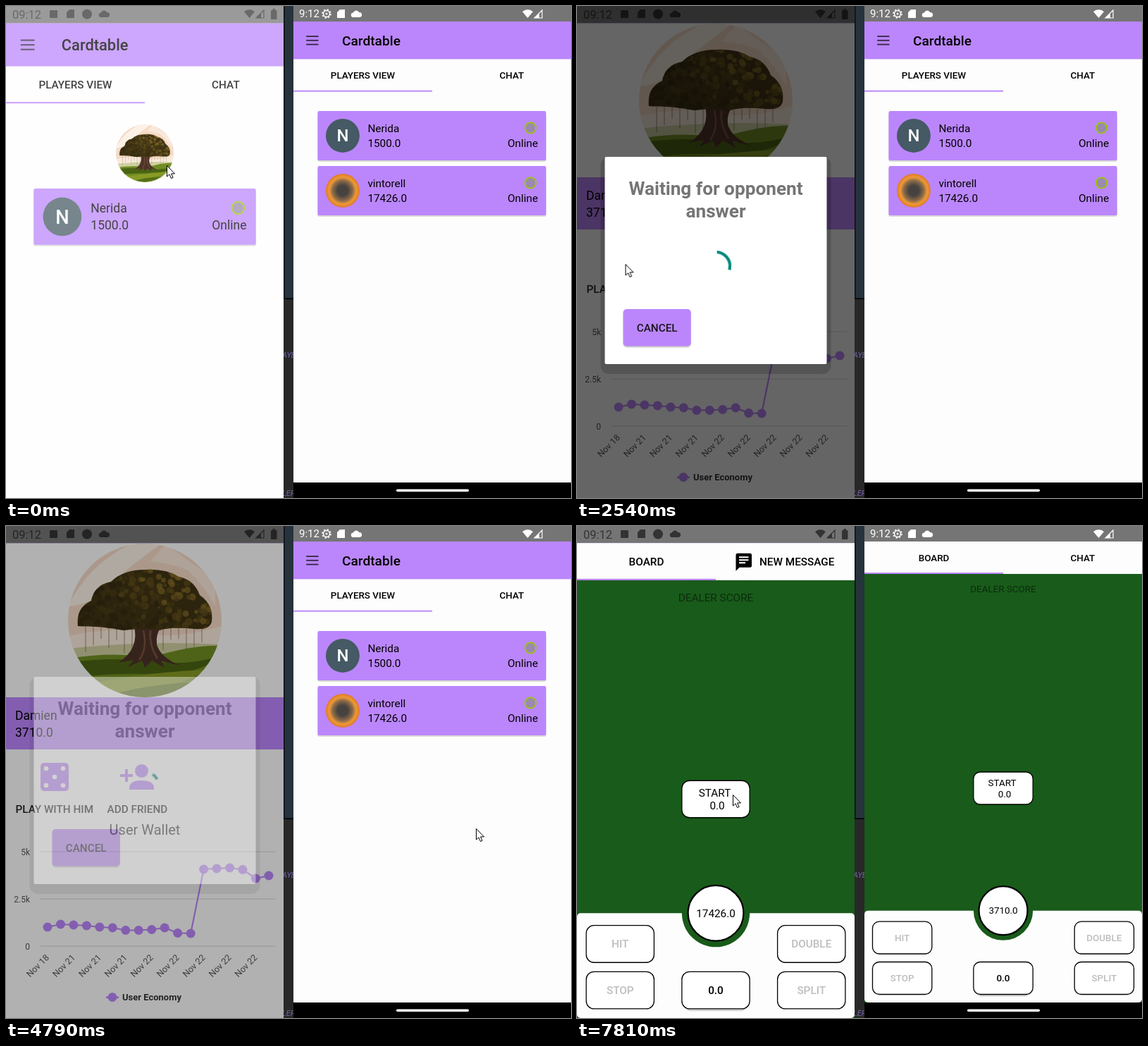
Animation, 802 px wide and 698 px high, one loop 8000 ms. Source, as an HTML page:

```html
<!DOCTYPE html>
<html lang="en">
<head>
<meta charset="utf-8">
<title>Card table on two phones</title>
<style>
html, body { margin: 0; width: 100%; height: 100%; overflow: hidden; background: #000; }
svg { display: block; width: 802px; height: 698px; font-family: Roboto, sans-serif; }
.m { font-weight: 500; }
.b { font-weight: 700; }
.k { animation: 8s step-end infinite; }

#wash { animation-name: wash; }
#profile { animation-name: profile; }
#tree { animation-name: tree; }
#chart { animation-name: chart; }
#reveal { animation-name: reveal; }
#dimL { animation-name: dimL; }
#refused { animation-name: refused; }
#waiting { animation-name: waiting; }
#boardL { animation-name: boardL; }
#dimR { animation-name: dimR; }
#invite { animation-name: invite; }
#boardR { animation-name: boardR; }
#cursor { animation-name: cursor; }

@keyframes wash { 0% { opacity: .265 } 1.5% { opacity: .2 } 3% { opacity: .1 } 4.5% { opacity: 0 } }
@keyframes profile { 0% { opacity: 0 } 1.5% { opacity: .25 } 3% { opacity: .6 } 4.5% { opacity: 1 } }
@keyframes tree {
  0% { transform: translate(197px, 209px) scale(.376) }
  1.5% { transform: translate(197px, 176px) scale(.6) }
  3% { transform: translate(197px, 146px) scale(.88) }
  4.5% { transform: translate(197px, 134px) }
}
@keyframes chart { 0% { opacity: 0 } 8.25% { opacity: 1 } }
@keyframes reveal { 0% { transform: scaleX(.45) } 9.75% { transform: scaleX(1) } }
@keyframes dimL { 0% { opacity: 0 } 29.875% { opacity: .2 } 31.75% { opacity: .6 } 59.875% { opacity: .3 } 61.375% { opacity: 0 } }
@keyframes refused { 0% { opacity: 0 } 29.875% { opacity: .72 } 31.75% { opacity: 0 } }
@keyframes waiting { 0% { opacity: 0 } 31.75% { opacity: 1 } 59.875% { opacity: .4 } 61.375% { opacity: 0 } }
@keyframes boardL { 0% { opacity: 0 } 66.25% { opacity: .5 } 67.75% { opacity: 1 } }
@keyframes dimR { 0% { opacity: 0 } 33.625% { opacity: .4 } 35.125% { opacity: .6 } 58% { opacity: 0 } }
@keyframes invite {
  0% { opacity: 0; transform: none }
  33.625% { opacity: .8; transform: translateX(20px) }
  35.125% { opacity: 1; transform: translateX(5.5px) }
  36.625% { opacity: 1; transform: translateX(1px) }
  38.5% { opacity: 1; transform: none }
  58% { opacity: 0; transform: none }
}
@keyframes boardR {
  0% { opacity: 0; transform: none }
  63.25% { opacity: .8; transform: translateX(18px) }
  64.75% { opacity: 1; transform: translateX(2.7px) }
  66.25% { opacity: 1; transform: none }
}
@keyframes cursor {
  0% { transform: translate(228px, 226px) }
  1.5% { transform: translate(210px, 238px) }
  3% { transform: translate(190px, 250px) }
  4.5% { transform: translate(173px, 260px) }
  6.375% { transform: translate(140px, 312px) }
  8.25% { transform: translate(115px, 322px) }
  9.75% { transform: translate(94px, 334px) }
  11.625% { transform: translate(80px, 350px) }
  13.125% { transform: translate(68.5px, 366px) }
  41.125% { transform: translate(440px, 400px) }
  43% { transform: translate(490px, 424px) }
  44.5% { transform: translate(527px, 430px) }
  46.375% { transform: translate(585px, 431px) }
  47.875% { transform: translate(635px, 432px) }
  49.75% { transform: translate(655px, 431px) }
  52.75% { transform: translate(667px, 430px) }
  56.125% { transform: translate(669px, 428px) }
  58% { transform: translate(667px, 429px) }
  69.25% { transform: translate(661px, 428px) }
  71.125% { transform: translate(620px, 425px) }
  72.625% { transform: translate(598px, 423px) }
  74.5% { transform: translate(327px, 368px) }
  78% { transform: translate(324px, 367px) }
  79.875% { transform: translate(318px, 345px) }
  81.375% { transform: translate(304px, 312px) }
  82.875% { transform: translate(286px, 291px) }
  84.75% { transform: translate(270px, 283px) }
  86.25% { transform: translate(256px, 296px) }
  87.75% { transform: translate(244px, 311px) }
  90.875% { transform: translate(242px, 303px) }
  92.75% { transform: translate(224px, 362px) }
  94.625% { transform: translate(222px, 375px) }
  97.625% { transform: translate(221px, 381px) }
}

/* Indeterminate spinner: the arc grows, then its tail catches up. */
#spin { animation: spin 8s linear infinite; }
#drift { animation: drift 1.333333s -.323s linear infinite; }
#arc { animation: arc 1.333333s -.323s cubic-bezier(.4, 0, .2, 1) infinite; }
@keyframes spin { from { transform: rotate(-593deg) } to { transform: rotate(964deg) } }
@keyframes drift { to { transform: rotate(90deg) } }
@keyframes arc {
  0% { stroke-dasharray: 2 98; stroke-dashoffset: 0 }
  50% { stroke-dasharray: 75 25; stroke-dashoffset: 0 }
  100% { stroke-dasharray: 2 98; stroke-dashoffset: -75 }
}
</style>
</head>
<body>
<svg id="stage" viewBox="0 0 802 698"></svg>
<script>
const W = 394, PURPLE = '#bb86fc', WHITE = '#fdfdfd', GREEN = '#195b1a';

const rect = (x, y, w, h, fill, more = '') =>
  `<rect x="${x}" y="${y}" width="${w}" height="${h}" fill="${fill}" ${more}/>`;
const circle = (x, y, r, fill, more = '') =>
  `<circle cx="${x}" cy="${y}" r="${r}" fill="${fill}" ${more}/>`;
const path = (d, fill, more = '') => `<path d="${d}" fill="${fill}" ${more}/>`;
const text = (x, y, str, size, fill = '#000', more = '') =>
  `<text x="${x}" y="${y}" font-size="${size}" fill="${fill}" ${more}>${str}</text>`;
const mid = (x, y, str, size, fill, more = '') =>
  text(x, y + size * .355, str, size, fill, `text-anchor="middle" ${more}`);
const group = (attrs, ...parts) => `<g ${attrs}>${parts.join('')}</g>`;
const at = (x, y, ...parts) => group(`transform="translate(${x} ${y})"`, ...parts);

function random(seed) {
  return () => (seed = seed * 16807 % 2147483647) / 2147483647;
}

const sdCard = (x, c) => path(`M${x} 9l4-4h7v12h-11z`, c);
const cloud = (x, c) => path(`M${x + 3} 16a3.2 3.2 0 0 1 0-6.400a4.400 4.400 0 0 1 8.200-.6a3.500 3.500 0 0 1 .8 7z`, c);
const signals = (x, c) =>
  path(`M${x} 8q7.500-6 15 0l-7.500 9z`, c) +
  path(`M${x + 17} 17l11-11v11z`, 'none', `stroke="${c}" stroke-width="1.2"`) +
  path(`M${x + 17} 17l7-7v7z`, c);

function tabs(s, y, label, chat) {
  const h = 48 * s, size = 14 * s, cy = y + h / 2;
  return rect(-30, y, W + 30, h, WHITE) +
    mid(W / 4, cy, label, size, '#000', 'class="m"') + chat(cy, size) +
    rect(-30, y + h - 2 * s, W / 2 + 30, 2 * s, PURPLE);
}
const plainChat = s => (cy, size) => mid(W * .75 + 15 * s, cy, 'CHAT', size, '#000', 'class="m"');
const newMessage = (cy, size) =>
  path(`M228 ${cy - 12}h17.500q2.500 0 2.500 2.500v15q0 2.500-2.500 2.500h-15l-5 5v-22.500q0-2.500 2.500-2.500z`, '#000') +
  path(`M230 ${cy - 6.500}h13.500m-13.500 4h13.500m-13.500 4h9`, 'none', 'stroke="#fff" stroke-width="2"') +
  text(259, cy + size * .355, 'NEW MESSAGE', size, '#000', 'class="m"');

function card(s, y, name, coins, avatar) {
  const x = 36 * s, w = W - 2 * x - (s > 1 ? 0 : 1), size = 16 * s, end = x + w;
  return rect(x - .5, y + 2, w + 1, 73 * s, '#000', 'rx="3" opacity=".14"') +
    rect(x, y, w, 73 * s, PURPLE, 'rx="2"') +
    at(x + 37 * s, y + 36.500 * s, avatar) +
    text(x + 74 * s, y + 31.200 * s, name, size) +
    text(x + 74 * s, y + 52.800 * s, coins, size) +
    text(end - 12 * s, y + 52.800 * s, 'Online', size, '#000', 'text-anchor="end"') +
    circle(end - 23 * s, y + 25 * s, 8 * s, '#9b8aae', `stroke="#9cc31c" stroke-width="${2 * s}"`);
}
const letter = s => circle(0, 0, 25 * s, '#455a64') + mid(0, 0, 'N', 25 * s, '#fff', 'class="m"');

function players(s, top, cards) {
  const cy = top + 28 * s;
  const bars = [-6, 0, 6].map(d => rect(19 * s, cy + (d - 1) * s, 18 * s, 2 * s, '#3a2b4e')).join('');
  return rect(0, top, W, 698 - top, WHITE) + rect(0, top, W, 56 * s, PURPLE) + bars +
    text(72 * s, cy + 7.200 * s, 'Cardtable', 20 * s, '#000', 'class="m"') +
    tabs(s, top + 56 * s, 'PLAYERS VIEW', plainChat(s)) + cards;
}

function board(s, top, bottom, coins, chat) {
  const size = 14 * s, c = W / 2, panel = bottom - 136 * s, bar = top + 48 * s, cy = (bar + bottom) / 2;
  const frame = (x, y) => rect(x - 44 * s, y - 24 * s, 88 * s, 48 * s, '#fff',
    `rx="${10 * s}" stroke="#000" stroke-width="1.300"`);
  const off = (x, y, str) => frame(x, y) + mid(x, y, str, size, '#bdbdbd', 'class="m"');
  const l = 56 * s, r = W - l, y1 = panel + 40 * s, y2 = panel + 100 * s;
  return rect(-30, bar, W + 30, bottom - bar, GREEN) + tabs(s, top, 'BOARD', chat) +
    mid(c, bar + 22 * s, 'DEALER SCORE', size, '#0b2d0c') +
    frame(c, cy) + mid(c - 1.500, cy - 8.200 * s, 'START', size, '#000') + mid(c + 2, cy + 8.200 * s, '0.0', size, '#000') +
    rect(0, panel, W, bottom - panel, WHITE, 'rx="5"') +
    circle(c, panel, 44 * s, GREEN) +
    circle(c, panel, 36 * s, '#fff', 'stroke="#000" stroke-width="2.200"') +
    mid(c, panel, coins, size, '#000') +
    off(l, y1, 'HIT') + off(l, y2, 'STOP') + off(r, y1, 'DOUBLE') + off(r, y2, 'SPLIT') +
    rect(c - 42 * s, y2 - 20 * s, 84 * s, 47 * s, '#000', `rx="${10 * s}" opacity=".16"`) +
    frame(c, y2) + mid(c, y2, '0.0', size, '#000', 'class="m"');
}

function tree() {
  const rnd = random(77);
  const canopy = 'M-95 8Q-98-18-76-28Q-72-50-48-55Q-30-72 0-72Q30-74 48-62Q70-58 78-36Q98-22 95 2Q92 14 70 12Q40 8 20 14Q-5 10-30 14Q-60 8-95 8Z';
  let leaves = '', vines = '';
  for (let i = 0; i < 260; i++) {
    const x = rnd() * 190 - 95, y = rnd() * 86 - 74;
    const lit = x / 190 - y / 150 + rnd() * .6;
    leaves += circle(x.toFixed(1), y.toFixed(1), (2 + rnd() * 3.500).toFixed(1),
      lit > .85 ? '#8b7026' : lit > .6 ? '#66521c' : lit > .3 ? '#4d3f17' : '#352b10', 'opacity=".7"');
  }
  for (let x = -84; x < 90; x += 11) vines += `M${x} 8v${(18 + rnd() * 20).toFixed(0)}`;
  return group('clip-path="url(#disc)"',
    rect(-110, -110, 220, 220, '#f5dac5'),
    path('M-109-20Q-80-80-20-108L24-109Q-30-72-58-40Q-80-22-109-20Z', '#fcf1e7'),
    path('M30-109Q60-84 100-60V-20Q84-50 60-72Q40-80 8-84Z', '#fae8da'),
    path('M-109 22Q-40 8 0 18T109 8V50H-109Z', '#f9eadb'),
    path('M-109 40Q0 28 109 34V64H-109Z', '#cfd0a2'),
    path('M-109 54Q-50 44 10 52Q70 34 109 36V109H-109Z', '#718d22'),
    path('M-109 60Q-40 50 30 60Q70 62 109 50Q70 82 0 76Q-60 74-109 84Z', '#4b6413'),
    path('M-100 96Q-20 74 90 70Q40 96-30 109H-100Z', '#879a25'),
    path('M-60 109Q0 90 70 88L40 109Z', '#566f12'),
    path(vines, 'none', 'stroke="#6b4c38" stroke-width="1.200" opacity=".5"'),
    path('M-16 5Q-6 40-38 60L-16 56L-24 66L-4 57L0 67L10 57L28 67L24 58L50 64Q22 52 17 34Q15 18 26 5Z', '#4d3328'),
    path('M-2 14Q4 40-8 56M8 14Q6 36 18 54', 'none', 'stroke="#7a5440" stroke-width="2.500"'),
    path(canopy, '#403414'), group('clip-path="url(#canopy)"', leaves)) +
    `<clipPath id="disc"><circle r="109"/></clipPath><clipPath id="canopy"><path d="${canopy}"/></clipPath>`;
}

function profile() {
  const pips = [[57, 344], [81, 344], [69, 356], [57, 368], [81, 368]].map(([x, y]) => circle(x, y, 3.300, '#fff')).join('');
  return rect(0, 24.500, W, 674, WHITE) + rect(0, 243, W, 74, PURPLE) +
    text(13, 275, 'Damien', 17.500) + text(13, 298.500, '3710.0', 17.500) +
    rect(49, 336, 40, 40, PURPLE, 'rx="5"') + pips +
    circle(192.500, 347.500, 9.500, PURPLE) + path('M175 374v-4q2-9 17.500-9t17.500 9v4z', PURPLE) +
    path('M162 354h18m-9-9v18', 'none', `stroke="${PURPLE}" stroke-width="4"`) +
    text(13.500, 407, 'PLAY WITH HIM', 15.300, '#222', 'class="m"') +
    text(143.500, 407, 'ADD FRIEND', 15.300, '#222', 'class="m"');
}

function chart() {
  const ys = [569, 565, 566, 567, 569, 570, 573.5, 573.5, 572.5, 570, 577.5, 578, 487, 486, 485, 487.5, 500, 496];
  const pts = ys.map((y, i) => [+(59 + i * 18.47).toFixed(1), y]);
  const axis = [[462, '5k'], [529, '2.5k'], [596, '0']].map(([y, label]) =>
    rect(49, y - .5, 334, 1.200, '#dcdcdc') + text(34, y + 5, label, 12, '#555', 'text-anchor="end"')).join('');
  const days = [18, 21, 21, 21, 22, 22, 22, 22, 22].map((d, i) =>
    at(62 + i * 36.94, 613, text(0, 0, 'Nov ' + d, 12.500, '#555', 'text-anchor="end" transform="rotate(-45)"'))).join('');
  return mid(197, 431, 'User Wallet', 20, '#333') + axis + days +
    group('clip-path="url(#shown)"',
      `<polyline points="${pts.join(' ')}" fill="none" stroke="${PURPLE}" stroke-width="2.200"/>`,
      ...pts.map(([x, y]) => circle(x, y, 6.500, PURPLE))) +
    rect(142, 667.500, 18, 2.500, PURPLE) + circle(151, 668.500, 6.500, PURPLE) +
    text(165, 673, 'User Economy', 13, '#333', 'class="b"') +
    `<clipPath id="shown"><rect id="reveal" class="k" width="${W}" height="698"/></clipPath>`;
}

function button(x, y, s, label) {
  const w = 88 * s, h = 48 * s;
  return rect(x, y + 2, w, h, '#000', 'rx="5" opacity=".2"') + rect(x, y, w, h, PURPLE, 'rx="5"') +
    mid(x + w / 2, y + h / 2, label, 14 * s, '#1a1320', 'class="m"');
}
const shadow = (x, y, w, h) => rect(x - 6, y, w + 12, h + 14, '#000', 'rx="12" opacity=".16"');

function prompt(y, h, lines, label) {
  return shadow(39.500, y, 315, h) + rect(39.500, y, 315, h, '#fff', 'rx="2"') +
    lines.map((l, i) => mid(197, y + 45 + i * 31.500, l, 26.200, '#757575', 'class="b"')).join('') +
    button(65.500, y + h - 78, 1.094, label);
}

function invite() {
  return shadow(26, 223, 343, 252) +
    rect(25.500, 223.500, 343, 251, '#fff', 'rx="6" stroke="#000" stroke-width="1.500"') +
    mid(197, 315.500, 'Invitation to play', 23, '#757575', 'class="b"') +
    mid(197, 373.500, 'vintorell want to play with you. Did you accept?', 15.330, '#6d6d6d') +
    button(75.700, 406, .958, 'CANCEL') + button(234, 406, .958, 'PLAY');
}

const L = 1.094, R = .958, INK = '#333';
const statusL = rect(0, 0, W, 24.500, '#757575') + text(9, 18, '09:12', 16.500, INK) +
  rect(62, 6, 11, 11, INK, 'rx="1"') + sdCard(86, INK) + circle(115, 11.500, 7, INK) + cloud(132, INK) +
  signals(338, INK) + rect(376, 6, 8.500, 13, INK, 'rx="1"') + rect(378.500, 4, 3.500, 3, INK);
const statusR = text(8, 16, '9:12', 15, '#fff') +
  circle(47, 11, 4.500, 'none', 'stroke="#fff" stroke-width="1.500"') +
  circle(47, 11, 6, 'none', 'stroke="#fff" stroke-width="1.500" stroke-dasharray="2.300 2.400"') + circle(47, 11, 1.500, '#fff') +
  sdCard(62, '#fff') + cloud(82, '#fff') + signals(325, '#fff');
const flame = circle(0, 0, 25 * R, 'url(#flame)');
const code = (y, str) => text(392, y, str, 11, '#7563a8', 'font-style="italic" font-family="Roboto, sans-serif"');

document.getElementById('stage').innerHTML =
  `<defs><clipPath id="phone"><rect width="${W}" height="698"/></clipPath>
   <radialGradient id="flame"><stop offset=".3" stop-color="#45423f"/><stop offset=".6" stop-color="#8d6a48"/><stop offset=".8" stop-color="#ee9a35"/><stop offset="1" stop-color="#e0782a"/></radialGradient></defs>` +
  rect(394, 0, 14, 416, '#26333c') + rect(394, 415, 14, 283, '#282828') + rect(394, 414.500, 14, 1.500, '#000') +
  rect(394, 0, 1.500, 415, '#0b0f12') + code(499, 'AYE') + code(695, 'LER') +
  group('clip-path="url(#phone)"',
    statusL,
    players(L, 24.500, card(L, 259, 'Nerida', '1500.0', letter(L))),
    rect(0, 0, W, 698, '#fff', 'id="wash" class="k"'),
    group('id="profile" class="k"', profile()),
    group('id="chart" class="k"', chart()),
    group('id="tree" class="k"', tree()),
    rect(0, 0, W, 698, '#000', 'id="dimL" class="k"'),
    group('id="refused" class="k"', prompt(249.500, 224, ['Opponent cancel the', 'request'], 'OK')),
    group('id="waiting" class="k"', prompt(214, 294, ['Waiting for opponent', 'answer'], 'CANCEL'),
      at(197, 369, group('id="spin"', group('id="drift"',
        '<circle id="arc" r="20" pathLength="100" fill="none" stroke="#00897b" stroke-width="4.200"/>')))),
    group('id="boardL" class="k"', board(L, 24.500, 698, '17426.0', newMessage))) +
  at(408, 0, group('clip-path="url(#phone)"',
    rect(0, 0, W, 22, '#757575'),
    players(R, 22, card(R, 149, 'Nerida', '1500.0', letter(R)) + card(R, 227, 'vintorell', '17426.0', flame)),
    rect(0, 0, W, 698, '#000', 'id="dimR" class="k"'),
    group('id="invite" class="k"', invite()),
    group('id="boardR" class="k"', board(R, 22, 676, '3710.0', plainChat(R))),
    statusR, rect(0, 676, W, 22, '#000'), rect(146, 685.500, 103, 3.500, '#fff', 'rx="1.750"'))) +
  group('id="cursor" class="k"', path('M.5.5v15.500l3.500-3.200 2.500 5.700 2.600-1.100-2.500-5.500h4.900z', '#fff', 'stroke="#000"'));
</script>
</body>
</html>
```
